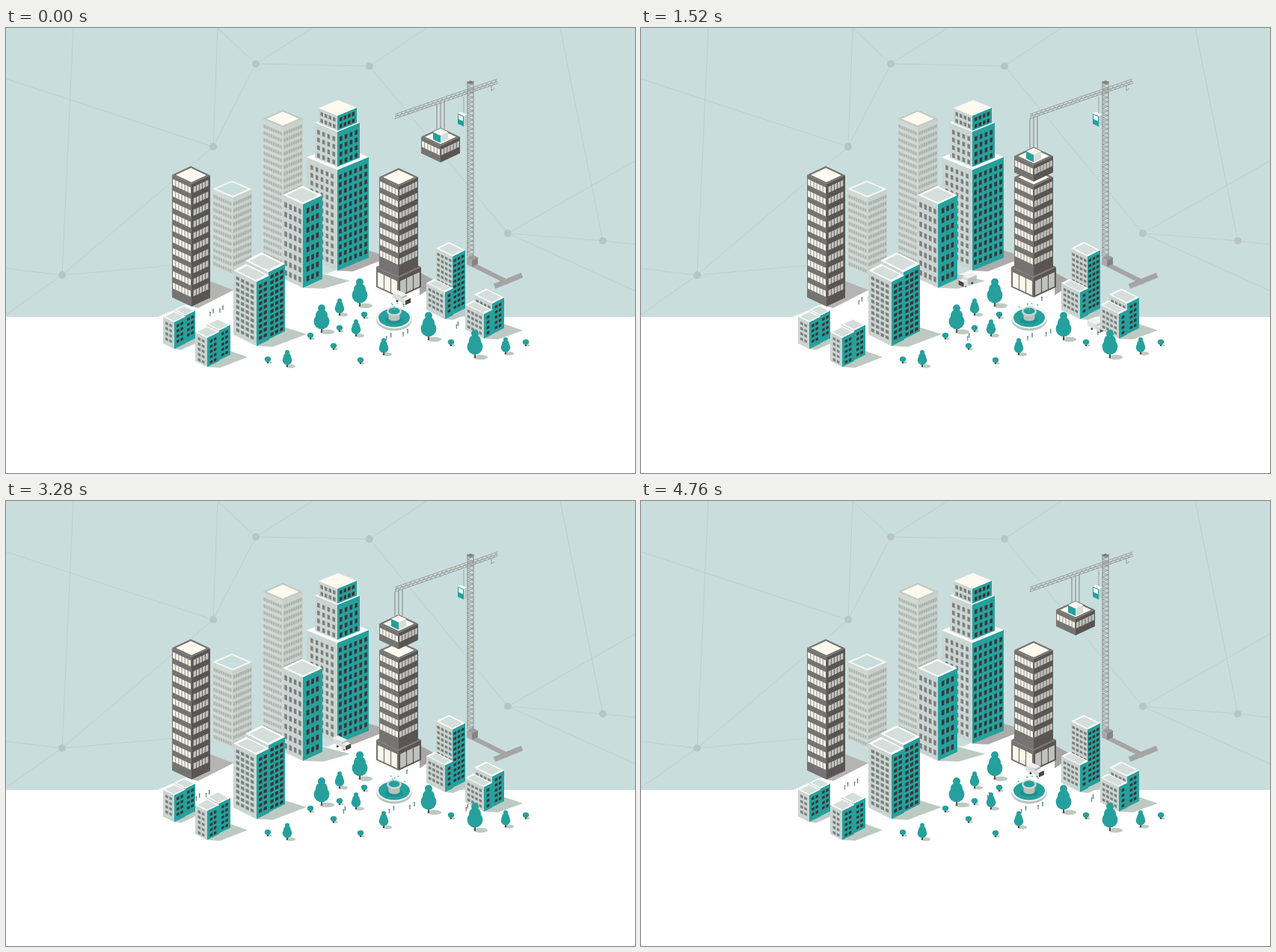
Write an HTML page with a canvas that moves like this. It is 841 by 596 pixels and loops after 4800 ms.

```html
<!DOCTYPE html>
<html lang="en">
<head>
<meta charset="utf-8">
<title>City</title>
<style>
html, body { margin: 0; width: 100%; height: 100%; overflow: hidden; background: #fff; }
canvas { display: block; width: 841px; height: 596px; }
</style>
</head>
<body>
<canvas id="stage" width="841" height="596"></canvas>
<script>
const W = 841, H = 596, HORIZON = 387, LOOP = 4800;
const SKY = '#c9dddd', TEAL = '#26a09d', PALE = '#cad5d2', CREAM = '#fff9ef';
const SHADE = '#bccac2', GREY = '#a5a5a4', STEEL = '#989897', INK = '#3b3534';
const stage = document.getElementById('stage').getContext('2d');
let c = stage;

// Drawing helpers, all painting on the current context c
function trace(p) {
  c.beginPath();
  for (let i = 0; i < p.length; i += 2) c.lineTo(p[i], p[i + 1]);
}
function poly(fill, ...p) {
  c.fillStyle = fill;
  trace(p);
  c.fill();
}
function line(color, width, ...p) {
  c.strokeStyle = color;
  c.lineWidth = width;
  trace(p);
  c.stroke();
}
function oval(fill, x, y, rx, ry = rx) {
  c.fillStyle = fill;
  c.beginPath();
  c.ellipse(x, y, rx, ry, 0, 0, 7);
  c.fill();
}

// A sheared wall with evenly spaced windows
function wall(x, y, slope, w, h, fill, glass, m) {
  c.save();
  c.transform(1, slope, 0, 1, x, y);
  c.fillStyle = fill;
  c.fillRect(0, 0, w, h);
  if (glass) {
    const { dx, dy, w: gw, h: gh, top } = m.win;
    const nx = Math.max(1, Math.floor((w - 1) / dx));
    const ny = Math.floor((h - top) / dy + 0.35);
    const x0 = (w - (nx - 1) * dx - gw) / 2;
    c.fillStyle = glass;
    for (let i = 0; i < nx; i++)
      for (let j = 0; j < ny; j++) c.fillRect(x0 + i * dx, top + j * dy, gw, gh);
  }
  c.restore();
}

// Isometric block; (x, y) is the front corner of its roof
function box(x, y, lw, rw, h, m) {
  const s = m.s || 0.47;
  wall(x - lw, y - lw * s, s, lw, h, m.l, m.wl, m);
  wall(x, y, -s, rw, h, m.r, m.wr, m);
  const mx = x + (rw - lw) / 2, my = y - (lw + rw) * s / 2;
  const p = [x, y, x - lw, y - lw * s, x - lw + rw, y - (lw + rw) * s, x + rw, y - rw * s];
  const roof = (fill, k) => poly(fill, ...p.map((v, i) => i % 2 ? my + (v - my) * k : mx + (v - mx) * k));
  roof(m.rim, 1);
  if (m.roof) roof(m.roof, 0.8);
}

// Ground shadow of a block whose lowest corner is (x, y)
function cast(x, y, rw, len, fill = SHADE) {
  const ry = y - rw / 2;
  poly(fill, x, y, x + rw, ry - 6, x + rw + len, ry + len * 0.1, x + len * 0.75, y + 1);
}

const win = (dx, dy, w, h, top) => ({ dx, dy, w, h, top });
const dark = { l: '#757472', r: '#5a5553', wl: '#fbf6ea', wr: '#bfc2bc', rim: '#757473', roof: CREAM, win: win(4.1, 15.4, 3.3, 8, 5) };
const lobby = { ...dark, roof: null, win: win(9, 24, 7.8, 19, 6) };
const city = { l: PALE, r: TEAL, wl: '#7b7f7e', wr: INK, rim: '#fff', roof: '#d5dedb', s: 0.5, win: win(6.4, 7.7, 4.3, 4.3, 6) };
const small = { ...city, win: win(5.2, 7, 3.6, 3.6, 5) };
const mid = { ...city, s: 0.46, win: win(6.3, 13, 3.5, 7, 8) };
const high = { ...city, s: 0.41, roof: null, win: win(6.8, 10.4, 3.5, 6, 8) };
const faint = { l: '#d0d9d4', r: '#c8d1cc', wl: '#aeb7b1', wr: '#a9b1ac', rim: '#c0c9c3', roof: CREAM, s: 0.43, win: win(3.1, 9, 2.5, 4.6, 7) };
const grab = { l: TEAL, r: '#d3dedc', rim: CREAM };
const van = { l: '#d9dddb', r: '#b9bfbc', rim: '#eef0ee' };
const cabRight = { l: '#d9dddb', r: '#4a4442', rim: '#eef0ee' };
const cabLeft = { ...cabRight, l: '#4a4442', r: '#d9dddb' };

function sky() {
  c.fillStyle = '#fff';
  c.fillRect(0, 0, W, H);
  c.fillStyle = SKY;
  c.fillRect(0, 0, W, HORIZON);
  const [a, b, d, e, f, g] = [[334, 48], [486, 51], [277, 159], [75, 331], [671, 275], [798, 285]];
  const links = [[e, d, a, b, f, g], [[90, 0], e, [0, 384]], [[0, 68], d, [283, 0], a, [410, 0]],
    [[0, 322], e, [222, 318]], [[741, 0], g, [W, 290]], [[W, 178], f, [W, 352]], [b, [562, 0]]];
  for (const l of links) line('#b9c8c9', 0.7, ...l.flat());
  for (const p of [a, b, d, e, f, g]) oval('#b7c6c4', ...p, 5);
}

function ground() {
  poly('#fff', 203, HORIZON, 240, 371, 304, 351, 345, 326, 430, 329, 486, 304, 556, 338, 590, HORIZON);
  poly('#b4b5b2', 248, 373, 273, 339, 304, 351, 257, 375);
  poly(GREY, 553, 327, 573, 338, 562, 352, 553, 358);
  cast(443, 325, 42, 28, '#adacab');
  cast(397, 348, 26, 37);
  cast(335, 426, 38, 29);
  cast(226, 430, 27, 11);
  cast(269, 454, 31, 23);
  cast(588, 390, 26, 13);
  cast(639, 416, 27, 25);
  line(GREY, 6, 624, 317, 672, 341);
  line(GREY, 7, 653, 346, 690, 331);
}

const jib = x => 121.5 - 0.345 * (x - 520);
function crane() {
  box(623, 311, 7, 8, 9, { l: '#aaa9a8', r: '#858483', rim: '#9b9a99' });
  for (const x of [617, 625]) line(STEEL, 1.3, x, 71, x, 306);
  for (let y = 72; y < 304; y += 6) {
    line(STEEL, 0.9, 617, y, 625, y + 3, 617, y + 6);
    line(STEEL, 0.8, 617, y + 3, 625, y + 3);
  }
  for (const d of [-6, -3, 0]) line(STEEL, 0.9, 520, jib(520) + d, 657, jib(657) + d);
  for (let x = 520; x < 656; x += 6) line(STEEL, 0.8, x, jib(x), x + 3, jib(x) - 6, x + 6, jib(x + 6));
  box(621, 75, 5, 5, 1, { l: STEEL, r: STEEL, rim: '#7f7e7d' });
  line(STEEL, 1, 649, 76, 649, 84, 653, 81);
  line(STEEL, 0.8, 612, 92, 612, 114);
  box(612, 118, 8, 4, 14, { l: TEAL, r: '#b9cfce', rim: '#fff' });
  wall(605, 116, 0.47, 6, 6, '#f3f6f4');
}

function farCity() {
  sky();
  ground();
  box(370, 133, 27, 27, 186, faint);
  box(303, 227, 27, 26, 104, { ...faint, rim: '#f4f6f2', roof: SKY });
  box(443, 190, 41, 42, 135, high);
  box(443, 139, 30, 30, 47, high);
  box(443, 117.5, 25, 26, 20, { ...high, rim: CREAM, win: win(5.5, 9, 3.5, 5, 4) });
  box(248, 209, 26, 25, 164, dark);
  box(397, 236, 27, 26, 112, mid);
}

function nearCity() {
  crane();
  box(525, 334, 30, 30, 27, lobby);
  box(525, 212, 26, 26, 120, dark);
  box(351, 327, 31, 22, 90, city);
  box(335, 340, 31, 17, 86, city);
  box(597, 306, 22, 17, 78, small);
  box(587, 354, 25, 11, 36, small);
}

function fountain(x, y) {
  oval('#b9c4c0', x, y + 2, 24, 15.5);
  oval('#f3f6f4', x, y - 0.5, 24, 15);
  oval(TEAL, x, y, 21, 12.5);
  oval('#1d8f90', x, y + 3, 12, 5);
  oval('#b9c1bc', x, y + 1, 7.5, 3.5);
  c.fillStyle = '#b9c1bc';
  c.fillRect(x - 7.5, y - 8, 15, 9);
  oval('#cdd5d0', x, y - 8.5, 10, 6.5);
  oval(TEAL, x, y - 9, 7.5, 4.3);
}

function tree(x, y, h) {
  oval(SHADE, x + h * 0.2, y - 1, h * 0.2 + 2, h * 0.06 + 1);
  c.fillStyle = '#4b3a30';
  c.fillRect(x - 0.8, y - h * 0.3, 1.8, h * 0.3);
  if (h < 14) return oval(TEAL, x, y - h * 0.6, h * 0.47, h * 0.4);
  for (const r of [0.275, 0.21, 0.13]) oval(TEAL, x, y - h * (1.28 - 3.2 * r), h * r);
}

function garden() {
  fountain(519, 388);
  box(240, 385, 15, 13, 37, small);
  box(225, 394, 15, 15, 36, small);
  box(285, 405, 17, 15, 40, small);
  wall(268, 400, 0.47, 13, 3, INK);
  box(269, 415, 16, 16, 39, small);
  box(650, 369, 24, 16, 41, small);
  box(639, 383, 25, 11, 33, small);
  const groves = {
    38: [[473, 373], [422, 408], [565, 418], [627, 442]],
    23: [[446, 385], [468, 413], [505, 438], [668, 437], [376, 454]],
    9: [[479, 389], [446, 407], [407, 417], [438, 431], [474, 450], [350, 449], [595, 426], [695, 426]]
  };
  for (const h in groves) for (const [x, y] of groves[h]) tree(x, y, +h);
}

function layer(paint) {
  const cv = document.createElement('canvas');
  cv.width = W;
  cv.height = H;
  c = cv.getContext('2d');
  paint();
  c = stage;
  return cv;
}
const [back, front, park] = [farCity, nearCity, garden].map(layer);

// Moving parts
const clamp = v => Math.min(1, Math.max(0, v));
const ease = p => p < 0.5 ? 2 * p * p : 1 - 2 * (1 - p) * (1 - p);
const ramp = (t, from, to) => ease(clamp((t - from) / (to - from)));

function load(t) {
  const left = ramp(t, 0, 960) - ramp(t, 3400, 4720);
  const down = ramp(t, 960, 2080) - ramp(t, 2760, 3300);
  const x = 581 - 56 * left, y = 158 + 18.5 * left + 14.5 * down;
  box(x, y, 26, 26, 22, dark);
  for (const d of [-5, 0, 5]) line('#8b8b8a', 1.1, x + d, jib(x + d), x + d, y - 15);
  box(x, y - 14, 10, 10, 10, grab);
}

function dust(t) {
  const p = (t - 1880) / 960;
  if (p < 0 || p > 1) return;
  c.globalAlpha = 0.75 * Math.min(1, 8 * p, 3 * (1 - p));
  for (const side of [-1, 1])
    for (let i = 0; i < 4; i++)
      oval('#989998', 525 + side * (22 + i * 2.4 + p * 6), 209 + p * 3 + i % 2, 3.6 - i * 0.4, 1.6);
  c.globalAlpha = 1;
}

// dir is 1 when driving to the right, -1 to the left
function truck(x, y, dir) {
  oval(INK, x - 6 * dir, y + 2.5, 1.5);
  oval(INK, x + 3 * dir, y + 6.5, 1.5);
  const block = (bx, by, len, h, m) => dir > 0 ? box(bx, by, len, 7, h, m) : box(bx, by, 7, len, h, m);
  block(x, y - 3, 12, 7, van);
  block(x + 5 * dir, y + 2, 5, 6, dir > 0 ? cabRight : cabLeft);
}
function truckRight(t) {
  const d = (t + 2300) % LOOP - 2300;
  const x = 529 + 0.0525 * d;
  c.save();
  c.beginPath();
  c.rect(423, 0, W, H);
  c.clip();
  c.globalAlpha = clamp((1750 - d) / 250);
  truck(x, 363 + 0.465 * (x - 529), 1);
  c.restore();
}
function truckLeft(t) {
  if (t > 3100) return;
  const x = 515 - 0.0515 * t;
  truck(x, 325 + 0.48 * (466 - x), -1);
}

function person(x, y, color) {
  line(color, 1.4, x, y - 2, x, y + 2.5);
  oval('#6f6460', x, y - 2.6, 0.9);
}
function pair(x, y, gap) {
  person(x - gap, y + 2, '#8a8d8d');
  person(x + gap, y - 2, TEAL);
}
function people(t) {
  const sway = peak => Math.cos(2 * Math.PI * (t - peak) / LOOP);
  pair(516 + 5 * sway(2000), 414, 3);
  pair(541 + 7 * sway(2300), 408.5, 3);
  pair(611 + 8 * sway(2640), 406 + 8 * sway(2640), 1);
  pair(425 + 40 * t / LOOP, 395 + 23 * Math.sin(Math.PI * t / LOOP), 1);
  const p = (t / LOOP + 0.5) % 1;
  for (const d of [0, 13]) pair(246 + 58 * p + d, 406 - 49 * p - d * 0.35, 2);
  if (t > 700 && t < 4500) person(536, 363, TEAL);
}

function drops(t) {
  for (let i = 0; i < 6; i++) {
    const p = (t / 800 + i * 0.37) % 1;
    oval('#5fc0bc', 519 + (i - 2.5) * 6 * p, 377 - 34 * p * (1 - p), 1);
  }
}

function draw(t) {
  c.drawImage(back, 0, 0);
  truckLeft(t);
  people(t);
  c.drawImage(front, 0, 0);
  truckRight(t);
  load(t);
  dust(t);
  c.drawImage(park, 0, 0);
  drops(t);
}

const start = performance.now();
function tick() {
  draw((performance.now() - start) % LOOP);
  requestAnimationFrame(tick);
}
tick();
</script>
</body>
</html>
```
